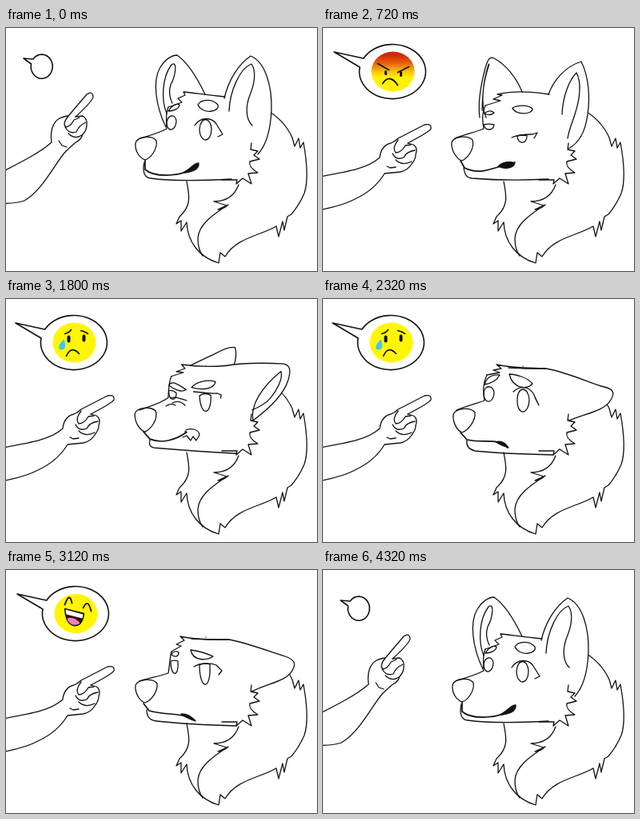
Animation of 389 by 304 pixels, one loop 4400 ms. Source, as an HTML page:

```html
<!DOCTYPE html>
<html lang="en">
<head>
<meta charset="utf-8">
<title>Mood wolf</title>
<style>
html, body { margin: 0; width: 100%; height: 100%; overflow: hidden; background: #fff; }
svg { display: block; width: 100vw; height: 100vh; }
path, ellipse { stroke-linecap: round; stroke-linejoin: round; }
.ink { fill: none; stroke: #111; stroke-width: 1.3; }
</style>
</head>
<body>
<svg viewBox="0 0 389 304">
  <defs>
    <linearGradient id="rage" x2="0" y2="1">
      <stop offset=".08" stop-color="#d0260a"/>
      <stop offset=".3" stop-color="#e8640c"/>
      <stop offset=".5" stop-color="#fbc40a"/>
      <stop offset=".65" stop-color="#fff200"/>
    </linearGradient>
  </defs>
  <g class="ink">
    <path d="M325 102C343 112 352 124 358 137L361 148L366 138L368 150L372 143C376 165 379 190 373 207Q367 221 357 233L352 236L348 253L346 242L341 261L338 248C318 260 288 262 274 286L268 281L266 294C242 287 227 268 226 243L219 254L219 241L213 245L217 236C233 222 229 208 226 192"/>
    <path d="M291 196C287 207 278 217 260 217L276 222L265 227Q273 226 278 221C258 234 241 246 240 263Q240 277 246 285"/>
  </g>
  <g id="wolf" class="ink"></g>
  <path class="ink" d="M307 144L306 152L315 154L310 159L317 164L305 167Q303 174 315 181L303 182L307 195L296 188L288 195L289 190L270 190"/>
  <g id="arm" class="ink"></g>
  <path id="bubble" class="ink" style="stroke-width:1.6"/>
  <g id="moods" class="ink">
    <g>
      <ellipse rx="27" ry="25" fill="url(#rage)" stroke="none"/>
      <path d="M-19 -10L-5 -2M6 1L20 -6M-13 15Q-4 2 6 17" stroke-width="1.8"/>
      <path d="M-9 0V3M10 1V5" stroke-width="3"/>
    </g>
    <g>
      <ellipse rx="27" ry="25" fill="#fff600" stroke="none"/>
      <path d="M-12 -11Q-7 -12 -4 -16M8 -15Q13 -14 17 -11M-10 17Q-4 3 6 14" stroke-width="1.6"/>
      <path d="M-7 -7V-2M12 -8V-3" stroke-width="4"/>
      <path d="M-13 -4C-21 3 -21 9 -16 9C-11 9 -10 4 -13 -4" fill="#45c5ee" stroke="none"/>
    </g>
    <g>
      <ellipse rx="27" ry="24.5" fill="#fff600" stroke="none"/>
      <path d="M-14 -11Q-8 -28 -5 -13M9 -7Q15 -20 19 -3" stroke-width="1.8"/>
      <path d="M-14 -6L10 0Q9 9 5 13Q0 17 -6 14Q-13 10 -14 -6Z" fill="#2b1512"/>
      <path d="M-13 -5L9 1L8 6L-12 1Z" fill="#fff" stroke="none"/>
      <path d="M-11 6Q-2 3 5 12Q0 16 -6 13Q-10 11 -11 6" fill="#f47fb0" stroke="none"/>
    </g>
  </g>
</svg>
<script>
const LOOP = 4400;
const $ = id => document.getElementById(id);

// Poses: 0 calm, 1 drowsy, 2 angry, 3 sad, 4 unsure, 5 happy.
// A missing pose repeats the one before it.
const parts = [
  { fill: '#fff', d: [ // far ear
    'M200 124C187 97 183 66 193 49C198 40 207 34 214 34C227 43 239 62 249 83',
    'M196 112C193 90 199 65 203 50C206 40 208 35 214 38C228 45 242 62 249 80',
    'M230 83C241 77 252 71 262 66C272 60 283 55 289 57C291 66 289 75 286 82',
    'M232 86C240 86 250 87 255 87C262 87 268 87 270 87C272 87 276 87 278 87', ,
    'M216 80C221 74 228 67 233 62C237 58 240 56 243 58C246 61 249 68 250 82'] },
  { d: [ // far ear, inside
    'M201 107C194 90 195 62 207 46C215 40 212 60 206 71C203 80 205 88 208 94',
    'M204 112C196 95 201 65 207 46C208 44 208 46 207 48C200 70 200 80 199 103',
    'M250 84C250 84 250 84 250 84C250 84 250 84 250 84C250 84 250 84 250 84'] },
  { fill: '#fff', d: [ // near ear
    'M273 88C278 66 290 46 306 35C324 42 333 72 332 103C331 125 326 146 315 158',
    'M282 83C288 66 303 48 323 42C333 62 334 88 331 108C328 130 321 143 307 151',
    'M274 83C295 78 325 76 347 77C355 79 355 86 352 98C347 115 334 133 309 152',
    'M279 87C308 92 340 108 352 110C364 113 365 118 360 126C352 141 325 144 308 152',
    'M279 87C305 92 335 104 349 108C360 112 363 116 359 124C352 140 325 142 308 152',
    'M284 81C300 78 320 70 340 67C356 66 358 72 357 84C352 112 335 125 309 150'] },
  { d: [ // near ear, inside
    'M279 104C280 78 293 50 307 45C314 55 310 72 305 84C300 97 299 113 308 122',
    'M299 108C300 85 308 65 317 56C324 68 321 90 315 108C312 118 308 126 306 138',
    'M309 152C305 130 322 104 349 82C352 92 344 108 334 120C328 127 318 133 308 137',
    'M308 151C308 151 308 151 308 151C308 151 308 151 308 151C308 151 308 151 308 151', ,
    'M310 150C307 126 330 104 350 73C358 84 349 102 340 112C332 122 322 132 309 140'] },
  { d: [ // forehead
    'M203 99L220 93L215 88L224 84L222 80C235 81 250 84 274 86',
    'M203 97L222 91L213 89L224 84L218 83C235 79 258 79 283 83',
    'M207 97L222 92L213 91L224 87L220 82C235 84 255 85 274 83',
    'M205 95L221 92L213 89L223 87L217 82C240 87 262 86 279 87',
    'M207 102L219 95L213 93L223 88L218 83C240 88 262 87 279 87',
    'M206 90L217 87L209 85L219 81L212 80C230 81 258 85 284 81'] },
  { d: [ // bridge of the snout
    'M203 99C200 106 200 114 201 126C192 131 178 135 169 138',
    'M203 97C199 106 199 113 201 126C192 130 176 133 165 138',
    'M207 97C204 104 204 112 203 123C193 131 178 135 167 139',
    'M205 95C200 106 200 114 202 127C192 131 178 134 167 139',
    'M207 102C205 108 205 118 203 129C193 133 178 135 167 139',
    'M206 90C204 100 204 108 201 120C190 125 176 124 166 123'] },
  { d: [ // far brow
    'M203 104C207 97 213 94 217 96C217 101 209 104 203 104Z',
    'M202 107C206 103 211 103 214 106C210 110 206 109 202 107Z',
    'M204 108C208 102 214 108 226 116C219 120 209 113 204 108Z',
    'M202 107C205 97 213 94 221 95C217 103 208 106 202 107Z',
    'M207 106C208 102 213 101 216 103C216 108 212 110 207 106Z',
    'M205 105C204 95 207 88 211 88C212 95 210 103 205 105Z'] },
  { d: [ // near brow
    'M240 96C244 89 258 88 265 96C268 105 246 109 240 96Z',
    'M237 100C244 96 257 96 262 101C262 109 240 109 237 100Z',
    'M232 113C238 104 252 101 262 103C262 110 250 116 232 113Z',
    'M233 94C240 94 256 98 262 106C257 113 238 114 233 94Z',
    'M231 100C238 101 250 104 259 108C252 113 234 115 231 100Z',
    'M227 98C224 80 246 78 252 96C246 99 236 99 227 98Z'] },
  { d: [ // far eye
    'M201 119C202 108 212 107 213 116C213 128 202 132 201 119Z',
    'M201 121C205 120 210 120 214 121C213 129 203 129 201 121Z',
    'M204 114C207 115 210 116 213 118C213 128 204 128 204 114Z',
    'M201 119C201 107 213 107 214 117C214 130 202 133 201 119Z',
    'M206 114C209 113 213 113 215 114C217 134 206 135 206 114Z',
    'M205 116C206 106 212 107 213 115C213 129 205 129 205 116Z'] },
  { d: [ // near eye
    'M242 127C243 110 256 111 257 126C257 144 243 145 242 127Z',
    'M243 135C246 134 252 134 255 134C256 146 243 146 243 135Z',
    'M242 120C247 119 252 119 256 120C257 147 243 147 242 120Z',
    'M243 127C243 108 257 109 258 126C257 146 243 146 243 127Z',
    'M242 118C246 117 252 117 255 118C257 151 242 152 242 118Z',
    'M242 132C239 104 256 100 257 131C253 133 247 133 242 132Z'] },
  { d: [ // upper lid
    'M236 122C243 111 257 111 263 120L271 133L265 136',
    'M236 137C243 134 255 133 262 133L268 131L264 138',
    'M234 116C240 117 250 120 264 118L269 118L269 124',
    'M238 116C245 109 256 108 263 118L270 133L265 123',
    'M235 121C243 116 256 116 263 119L270 126L266 131',
    'M240 116C243 104 258 103 264 112L267 120L266 128'] },
  { d: [ // nose
    'M162 144C165 135 183 134 188 141C190 151 181 163 174 165C166 162 161 153 162 144Z',
    'M161 143C164 135 181 134 187 140C190 150 182 162 174 166C167 164 160 153 161 143Z', ,
    'M163 144C167 136 185 135 190 142C191 152 182 164 174 167C167 164 162 154 163 144Z',
    'M162 144C166 136 184 135 189 142C190 152 182 163 174 166C167 164 161 154 162 144Z',
    'M158 130C161 121 179 120 185 127C187 138 179 150 170 153C163 149 157 139 158 130Z'] },
  { width: 1.7, d: [ // mouth
    'M174 165L174 177C186 188 222 186 240 173',
    'M172 166L177 175C198 185 210 175 240 168',
    'M172 166L180 175C195 182 212 176 225 164',
    'M172 167L180 176C200 181 220 173 231 186',
    'M172 167L179 176C200 182 222 178 236 188',
    'M165 152L172 156C184 171 221 172 232 153'] },
  { fill: '#111', d: [ // corner of the mouth
    'M221 181C231 177 234 169 241 169C242 177 232 181 221 181Z',
    'M219 173C226 167 234 167 240 169C238 176 226 177 219 173Z',
    'M225 164C225 164 225 164 225 164C225 164 225 164 225 164Z',
    'M216 179C222 177 228 180 232 186C226 184 221 182 216 179Z',
    'M219 180C226 180 232 183 237 189C231 187 225 185 219 180Z',
    'M230 155C234 150 240 147 244 149C242 152 236 152 230 155Z'] },
  { d: [ // jaw
    'M173 168C170 180 174 188 181 188C210 192 245 191 282 189',
    'M176 175C177 181 178 187 186 188C210 190 245 191 282 189',
    'M180 176C178 184 181 186 190 186C215 188 250 191 288 193',
    'M180 177C179 184 182 188 190 190C215 193 245 194 288 195',
    'M176 175C176 183 179 188 188 189C215 192 245 194 288 195',
    'M183 166C183 180 193 192 207 191C224 190 245 192 282 194'] }
];

// Details that belong to a single pose.
const details = {
  2: 'M206 124C212 122 216 124 226 127M208 130C214 127 220 129 224 133M200 134Q206 130 212 133M225 164C232 161 241 163 242 170L238 177L234 172L231 177L226 171L221 173',
  5: 'M186 168C187 178 192 185 204 187C216 186 223 178 230 157M190 180C196 173 202 176 206 183C212 176 218 174 222 175M184 167L187 175L191 168M206 169L209 176L213 168M204 187L208 182'
};

const armPaths = [
  ['M-30 193C0 177 38 160 57 143C55 130 58 118 67 113Q74 110 78 110L101 83Q108 78 109 86Q108 92 87 111',
   'M-30 191C20 181 52 179 71 162C72 153 76 146 85 144Q90 142 94 138L127 121Q136 119 135 126Q133 130 106 144'],
  ['M87 111L96 110Q102 114 101 121Q101 128 96 133Q94 140 86 144L75 154C62 168 46 203 23 216Q10 221 -30 219',
   'M106 144L113 146Q119 150 116 158Q116 164 111 170Q106 178 97 180L77 182C68 197 55 207 40 214Q20 225 -30 232'],
  ['M78 110Q70 120 75 124Q81 123 85 115L92 112M74 124Q79 133 88 130Q91 122 100 118M78 132Q86 140 95 134M66 141L70 147L76 149',
   'M94 140Q86 150 91 156Q98 156 103 147L110 146M87 157Q91 166 101 162Q104 155 115 153M91 165Q99 173 111 167M80 173L84 175L91 174']
];
const bubblePaths = ['M22 38L34 39A13.5 15 0 1 1 31.5 45Z', 'M14 30L50.7 38A41.5 34 0 1 1 46 49Z'];

const faceKeys = [[0, 0], [480, 0], [720, 1], [1080, 2], [1700, 2], [2160, 3], [2860, 3],
  [3120, 4], [3360, 5], [3740, 5], [4200, 0], [LOOP, 0]];
const reachKeys = [[0, 0], [20, 0], [500, 1], [4030, 1], [4300, 0], [LOOP, 0]];
const growKeys = [[0, 0], [20, 0], [460, 1], [3900, 1], [4240, 0], [LOOP, 0]];

function addPath(parent, fill = 'none', width = 1.3) {
  const p = document.createElementNS('http://www.w3.org/2000/svg', 'path');
  p.setAttribute('fill', fill);
  p.setAttribute('stroke-width', width);
  return parent.appendChild(p);
}

function mix(a, b, k) {
  const to = b.match(/-?[\d.]+/g);
  let i = 0;
  return a.replace(/-?[\d.]+/g, n => +(+n + (to[i++] - n) * k).toFixed(2));
}

// Surrounding key values and the eased progress between them.
function segment(keys, t) {
  const i = keys.findIndex(key => key[0] > t);
  const [t0, a] = keys[i - 1], [t1, b] = keys[i];
  const u = (t - t0) / (t1 - t0);
  return { a, b, k: u * u * (3 - 2 * u) };
}

function valueAt(keys, t) {
  const { a, b, k } = segment(keys, t);
  return a + (b - a) * k;
}

function jab(t, start, length) {
  const u = (t - start) / length;
  return u > 0 && u < 1 ? Math.sin(Math.PI * u) ** 2 : 0;
}

for (const part of parts) {
  for (let i = 1; i < 6; i++) part.d[i] ??= part.d[i - 1];
  part.node = addPath($('wolf'), part.fill, part.width);
}
const detail = addPath($('wolf'));
const armNodes = armPaths.map(() => addPath($('arm')));
const moods = [...$('moods').children];

function draw(now) {
  const t = now % LOOP;

  const { a, b, k } = segment(faceKeys, t);
  for (const { d, node } of parts) node.setAttribute('d', mix(d[a], d[b], k));
  detail.setAttribute('d', details[k < .5 ? a : b] || '');

  const reach = valueAt(reachKeys, t);
  armPaths.forEach(([up, out], i) => armNodes[i].setAttribute('d', mix(up, out, reach)));
  const push = jab(t, 1400, 310) + jab(t, 2480, 350);
  $('arm').setAttribute('transform', `translate(${14 * push} ${3 * push})`);

  const grow = valueAt(growKeys, t);
  const sway = grow * (1.7 * Math.sin(2 * Math.PI * (t / 480 - .04)) - .4);
  $('bubble').setAttribute('d', mix(...bubblePaths, grow));
  $('bubble').setAttribute('transform', `translate(${sway} 0)`);

  const mood = t < 1560 ? 0 : t < 2680 ? 1 : 2;
  moods.forEach((m, i) => m.setAttribute('visibility', i === mood && grow > .05 ? 'visible' : 'hidden'));
  $('moods').setAttribute('transform',
    `translate(${45 + 42.5 * grow + sway} ${48 + 6.5 * grow}) scale(${grow})`);

  requestAnimationFrame(frame);
}

const start = performance.now();
function frame() { draw(performance.now() - start); }
draw(0);
</script>
</body>
</html>
```
